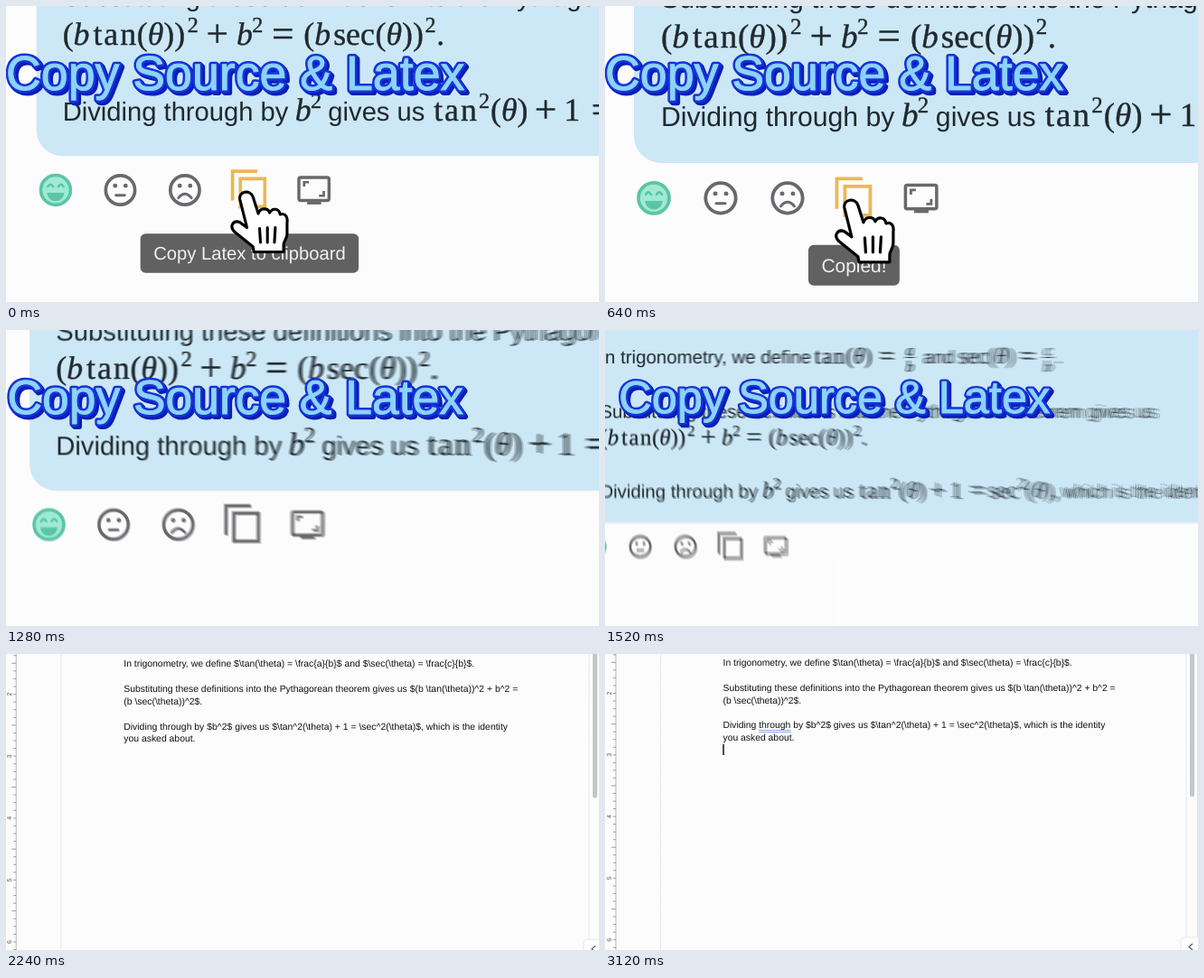
These frames come from a looping animation (656 by 328 pixels, 3.2 s). An HTML page:

```html
<!DOCTYPE html>
<html lang="en">
<head>
<meta charset="utf-8">
<title>Copy Source &amp; Latex</title>
<style>
  html, body { margin: 0; width: 100%; height: 100%; overflow: hidden; background: #fcfcfc; }
  svg { display: block; width: 656px; height: 328px; }
  text { font-family: "Liberation Sans", Arial, sans-serif; white-space: pre; text-rendering: geometricPrecision; }
  .prose { font-size: 30.2px; fill: #20292e; }
  .math { font-family: "Liberation Serif", "Times New Roman", serif; font-size: 37px; fill: #20292e; stroke: #20292e; stroke-width: .4; }
  .name { letter-spacing: 2px; }
  .sign { font-size: 45px; }
  .sup { font-size: 25px; }
  .frac { font-size: 25px; text-anchor: middle; }
  .var { font-style: italic; }
  .icon { fill: none; stroke: #68696c; stroke-width: 3.8; }
  .tip rect { fill: #616161; }
  .tip text { font-size: 20.95px; fill: #f1f1f1; }
  .title { font-size: 53.7px; stroke-linejoin: round; }
  .source { font-size: 10.37px; fill: #111; }
  .mark { font-size: 7px; fill: #555; text-anchor: middle; }
</style>
</head>
<body>
<svg viewBox="0 0 656 328">
  <defs>
    <g id="scene">
      <rect x="-600" y="-600" width="2600" height="1600" fill="#fcfcfc"/>
      <rect x="32" y="-500" width="1500" height="674" rx="30" fill="#cce7f5"/>
      <g id="formulas"></g>
      <g stroke-linecap="round">
        <g class="icon" style="stroke:#5cc5a6">
          <circle cx="54" cy="213" r="17" fill="#a0ead4"/>
          <path d="M45 217H63Q61 225 54 225T45 217Z" fill="#5cc5a6" stroke-width="1.500"/>
          <path d="M45 209Q48 204 51 209M57 209Q60 204 63 209" stroke-width="2.600"/>
        </g>
        <g class="icon">
          <circle cx="128" cy="213" r="16.700"/>
          <path d="M122 208h.1M134 208h.1" stroke-width="5"/>
          <path d="M123 219H133" stroke-width="3"/>
        </g>
        <g class="icon">
          <circle cx="202" cy="213" r="16.700"/>
          <path d="M196 208h.1M208 208h.1" stroke-width="5"/>
          <path d="M194.500 222Q202 213 209.500 222" stroke-width="3"/>
        </g>
      </g>
      <path id="copyIcon" class="icon" d="M256.500 225V191.500H285M265.500 200H293.500V232H265.500Z"/>
      <g class="icon">
        <rect x="332.500" y="198.500" width="34.500" height="26.500" rx="2" stroke-width="3.500"/>
        <path d="M342 227.500H358" stroke-width="4"/>
        <path d="M338.500 209V204H344M355.500 219.500H361V214" stroke-width="2.800"/>
      </g>
      <g id="copyTip" class="tip">
        <rect x="151" y="263" width="250" height="45" rx="6"/>
        <text x="166" y="293">Copy Latex to clipboard</text>
      </g>
      <g id="doneTip" class="tip">
        <rect x="225" y="265" width="101" height="45" rx="6"/>
        <text x="239.500" y="295">Copied!</text>
      </g>
      <g id="hand" stroke="#000" stroke-linejoin="round" stroke-linecap="round">
        <path fill="#fff" stroke-width="3.200" d="M265 224C263 214 277 212 280 221L286 240C288 233 297 233 299 239C302 233 310 234 311 241C317 239 320 244 319 250V263C319 269 315 271 315 276V284H281L280 278L259 261C252 254 258 247 265 250L273 256Z"/>
        <path fill="none" stroke-width="3.200" d="M287.500 257L288.500 273M296.500 256V273M305.500 256L304.500 273"/>
      </g>
    </g>
  </defs>

  <g id="chat">
    <g id="exposures"></g>
    <g id="title"></g>
  </g>

  <g id="doc">
    <rect width="656" height="328" fill="#fcfcfc"/>
    <g id="page">
      <g id="ruler"></g>
      <path d="M61.500 -60V400M643 -60V400" stroke="#cfd3de" stroke-dasharray="1 1"/>
      <path d="M655.500 -60V400" stroke="#e3e4e7"/>
      <rect x="647" y="-20" width="5" height="178" rx="2" fill="#c5c6c9"/>
      <rect x="637" y="314" width="30" height="30" rx="4" fill="#fff" stroke="#e6e6e8"/>
      <path d="M650 321L646 324.500L650 328" fill="none" stroke="#555" stroke-width="1.200"/>
      <g id="pasted"></g>
      <g id="editing">
        <path d="M170 84.500H205.500M170 86.500H205.500" stroke="#7796df" stroke-width=".8"/>
        <path d="M131 100V112" stroke="#111" stroke-width="1.500"/>
      </g>
    </g>
  </g>
</svg>

<script>
const LOOP = 3200, STEP = 80, EXPOSURES = 5;
const $ = id => document.getElementById(id);
const clamp = v => Math.max(0, Math.min(1, v));
const progress = (t, from, to) => clamp((t - from) / (to - from));
const smooth = p => p * p * (3 - 2 * p);
const show = (id, on) => $(id).setAttribute('visibility', on ? 'visible' : 'hidden');
const text = (cls, x, y, str) => `<text class="${cls}" x="${x}" y="${y}">${str}</text>`;

const prose = (x, y, str) => text('prose', x, y, str);
const math = (x, y, str) =>
  text('math', x, y, str.replace(/[bθ]/g, c => `<tspan class="var">${c}</tspan>`));
const tan = (x, y) => text('math name', x, y, 'tan');
const sign = (x, y, str) => text('math sign', x - 1.5, y + 2, str);
const squared = (x, y) => text('math sup', x, y - 14.5, '2');
const frac = (x, y, top) =>
  text('math frac var', x, y - 14, top) + text('math frac var', x, y + 13, 'b') +
  `<path d="M${x - 8} ${y - 10}h16" stroke="#20292e" stroke-width="1.500"/>`;

function buildFormulas() {
  const [intro, pyth, squares, divide] = [-87, 2, 46, 133];
  $('formulas').innerHTML = [
    prose(62, intro, 'In trigonometry, we define'), tan(413, intro),
    math(464, intro, '(θ)'), sign(520, intro, '='), frac(569, intro, 'a'),
    prose(591, intro, 'and'), math(649, intro, 'sec'), math(697, intro, '(θ)'),
    sign(750, intro, '='), frac(795, intro, 'c'), prose(808, intro, '.'),
    prose(62, pyth, 'Substituting these definitions into the Pythagorean theorem gives us'),
    math(62, squares, '(b'), tan(97, squares), math(147, squares, '(θ))'),
    squared(205, squares), sign(228, squares, '+'), math(261, squares, 'b'),
    squared(279, squares), sign(303, squares, '='), math(338, squares, '(b'),
    math(372, squares, 'sec'), math(420, squares, '(θ))'), squared(477, squares),
    math(490, squares, '.'),
    prose(62, divide, 'Dividing through by'), math(328, divide, 'b'), squared(346, divide),
    prose(366, divide, 'gives us'), tan(487, divide), squared(538.5, divide),
    math(552, divide, '(θ)'), sign(604, divide, '+'), math(636, divide, '1'),
    sign(669, divide, '='), math(699, divide, 'sec'), squared(748, divide),
    math(760, divide, '(θ),'), prose(819, divide, 'which is the identity')
  ].join('');
}

function buildTitle() {
  const layer = (offset, fill, stroke, width) =>
    `<text class="title" x="${offset}" y="${93 + offset}" fill="${fill}" stroke="${stroke}" ` +
    `stroke-width="${width}">Copy Source &amp; Latex</text>`;
  $('title').innerHTML = [3, 2, 1].map(d => layer(d, '#0a1fb8', '#0a1fb8', 6)).join('') +
    layer(0, '#1633d8', '#1633d8', 6) + layer(0, '#8dd3fa', '#8dd3fa', 1);
}

function buildDocument() {
  const inch = 68.3, second = 43.5;
  let ruler = '<path d="M12 -60V400" stroke="#b4b5ba"/>';
  for (let i = -10; i < 38; i++) {
    const y = second + i * inch / 8;
    const length = i % 4 === 0 && i % 8 !== 0 ? 5 : 3;
    ruler += `<path d="M${12 - length} ${y.toFixed(2)}H12" stroke="#86878c" stroke-width=".8"/>`;
  }
  for (let n = 1; n <= 6; n++) {
    const y = second + (n - 2) * inch;
    ruler += `<text class="mark" transform="translate(7 ${y}) rotate(-90)">${n}</text>`;
  }
  $('ruler').innerHTML = ruler;

  const line = (y, str) => text('source', 130.5, y, str);
  $('pasted').innerHTML = [
    line(13, String.raw`In trigonometry, we define $\tan(\theta) = \frac{a}{b}$ and $\sec(\theta) = \frac{c}{b}$.`),
    line(41, String.raw`Substituting these definitions into the Pythagorean theorem gives us $(b \tan(\theta))^2 + b^2 =`),
    line(54.5, String.raw`(b \sec(\theta))^2$.`),
    line(82.3, String.raw`Dividing through by $b^2$ gives us $\tan^2(\theta) + 1 = \sec^2(\theta)$, which is the identity`),
    line(96, 'you asked about.')
  ].join('');
}

const matrix = (s, x, y) => `matrix(${s} 0 0 ${s} ${x} ${y})`;

// Zooms in and settles, then pulls back before the document appears.
function chatCamera(t) {
  const settle = Math.exp(-t / 150);
  const pull = smooth(progress(t, 1200, 1680));
  return matrix(1 - .034 * settle - .437 * pull, 2.8 * settle - 64.1 * pull, 129.6 * pull - 1.8 * settle);
}

function render(t) {
  const fade = progress(t, 1600, 1760);
  show('chat', fade < 1);
  show('doc', fade > 0);
  $('doc').setAttribute('opacity', fade);

  const hovering = t < 1280;
  show('copyTip', t < 640);
  show('doneTip', t >= 640 && t < 1200);
  show('hand', hovering);
  $('copyIcon').style.stroke = hovering ? '#e9b857' : '';

  // Zoom blur from a few overlaid exposures, sharp near the left edge.
  const pull = progress(t, 1200, 1680);
  const spread = .02 * pull * (1 - pull);
  [...$('exposures').children].forEach((use, i) => {
    const s = 1 + (i - 2) * spread;
    const visible = i === 0 || spread > 0;
    use.setAttribute('display', visible ? 'inline' : 'none');
    use.setAttribute('transform', matrix(s, 0, 30 * (1 - s)) + ' ' + chatCamera(t));
  });

  const shrink = 1 - .081 * smooth(pull);
  $('title').setAttribute('transform', matrix(shrink, 255 * (1 - shrink), 75 * (1 - shrink)));

  const rest = 1 - progress(t, 1600, 2400);
  const zoom = .111 * rest * rest;
  $('page').setAttribute('transform', matrix(1 + zoom, -187 * zoom, 207 * zoom));
  show('pasted', t >= 2240);
  show('editing', t >= 3120);
}

buildFormulas();
buildTitle();
buildDocument();
$('exposures').innerHTML = Array.from({ length: EXPOSURES }, (_, i) =>
  `<use href="#scene" opacity="${1 / (i + 1)}"/>`).join('');

const start = performance.now();
function tick() {
  const t = (performance.now() - start) % LOOP;
  render(Math.floor(t / STEP) * STEP);
  requestAnimationFrame(tick);
}
tick();
</script>
</body>
</html>
```
